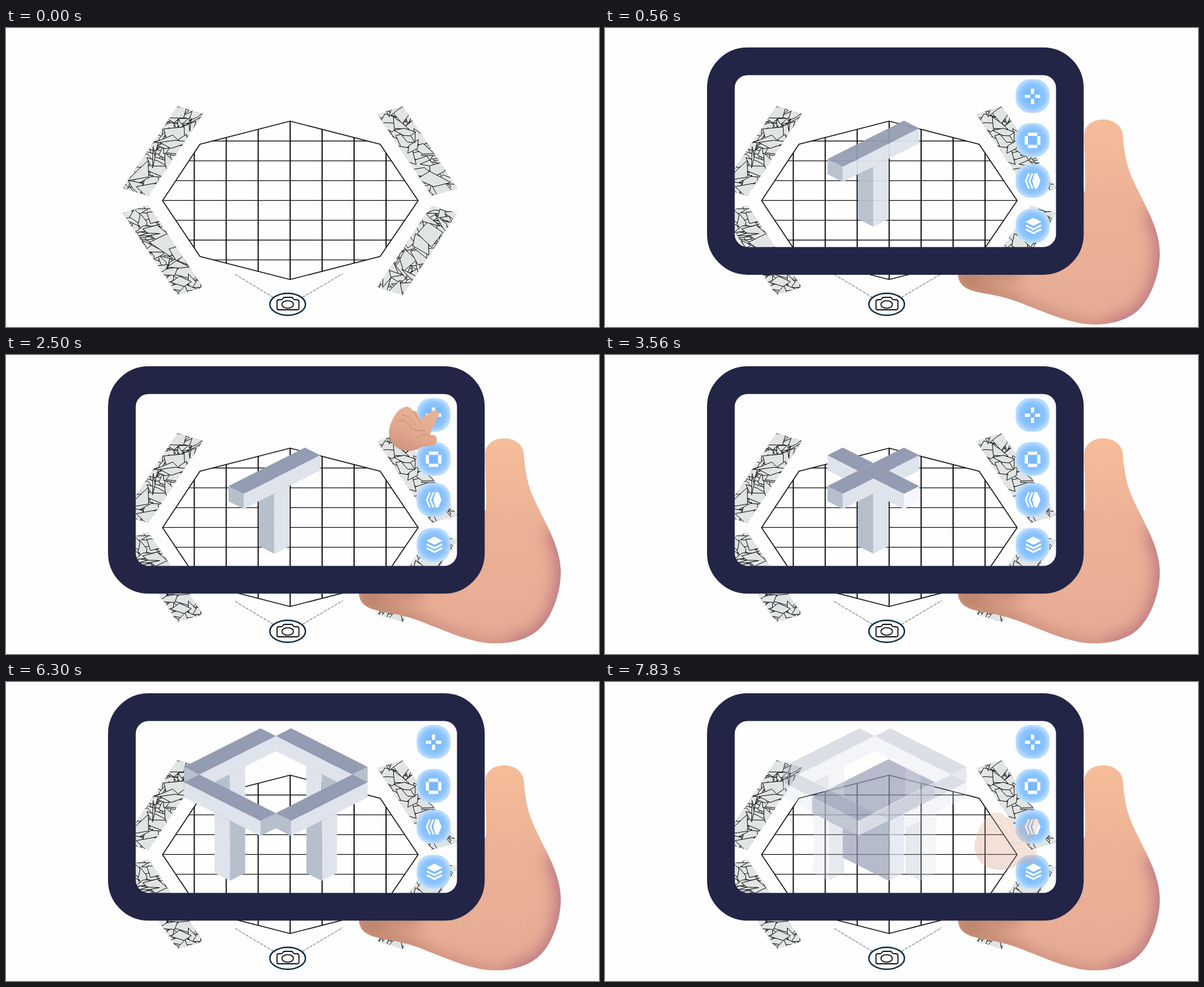
Animation, 1000 px wide and 504 px high, one loop 8000 ms. Source, as an HTML page:

```html
<!DOCTYPE html>
<html lang="en">
<head>
<meta charset="utf-8">
<title>Phone modelling loop</title>
<style>
  html, body { margin: 0; width: 100%; height: 100%; overflow: hidden; background: #fefefe; }
  svg { display: block; width: 100vw; height: 100vh; }
</style>
</head>
<body>
<svg viewBox="0 0 1000 504" fill="none">
  <defs>
    <path id="octagon" d="M479 157 631 196 695 291 631 385 479 424 327 385 264 291 327 196Z"/>
    <clipPath id="floorClip"><use href="#octagon"/></clipPath>
    <radialGradient id="glow">
      <stop offset=".3" stop-color="#78b8ff"/><stop offset=".75" stop-color="#90c6ff"/><stop offset="1" stop-color="#bcdefe"/>
    </radialGradient>
    <linearGradient id="skin" x1="0" y1="0" x2="0" y2="1">
      <stop offset="0" stop-color="#f5bd99"/><stop offset=".4" stop-color="#ecb296"/><stop offset="1" stop-color="#e6ab95"/>
    </linearGradient>
    <linearGradient id="fist" x1=".8" y1="0" x2=".3" y2="1">
      <stop offset="0" stop-color="#eab596"/><stop offset=".6" stop-color="#e0a88d"/><stop offset="1" stop-color="#d0957f"/>
    </linearGradient>
    <filter id="soft" filterUnits="userSpaceOnUse" x="560" y="100" width="440" height="440"><feGaussianBlur stdDeviation="14"/></filter>
    <path id="palm" d="M600 385H770L790 360V262H809C811 235 808 195 808 166C810 133 867 132 873 164C875 190 878 214 888 237C905 277 935 320 935.500 365C936 402 919 444 900 461C880 480 850 487 820 486C775 484 725 457 685 444C655 434 628 434 612 426C599 420 595 410 595 398Z"/>
    <clipPath id="palmClip"><use href="#palm"/></clipPath>
  </defs>

  <g id="strips"></g>
  <g stroke="#111">
    <g id="floor" clip-path="url(#floorClip)"></g>
    <use href="#octagon" stroke-width="1.6"/>
    <path opacity=".8" stroke-width=".9" stroke-dasharray="5 2" d="M451 454 386 415M500 454 568 414"/>
  </g>
  <g stroke="#111" stroke-width="1.8">
    <ellipse cx="475" cy="465.7" rx="30" ry="18.5" fill="#fefefe" stroke="#0e2d42" stroke-width="2.4"/>
    <path d="M460 458H464Q466 458 467 456T470 454H481Q483 454 484 456T487 458H490Q494 458 494 461V472Q494 475 490 475H460Q457 475 457 472V461Q457 458 460 458Z"/>
    <ellipse cx="475" cy="466" rx="9.7" ry="6.3"/>
  </g>

  <g id="models"></g>

  <g id="phone">
    <use href="#palm" fill="url(#skin)"/>
    <g clip-path="url(#palmClip)"><g filter="url(#soft)">
      <path stroke="#b8707f" stroke-width="36" d="M925 290C950 330 950 370 942 405C930 455 905 490 850 494"/>
      <path stroke="#b9796f" stroke-width="14" d="M850 494C820 494 770 486 700 452"/>
      <path stroke="#a86f58" stroke-width="16" d="M590 400C605 430 650 432 700 452M600 400H700"/>
    </g></g>
    <rect x="195.4" y="42.4" width="588.5" height="336.5" rx="45" stroke="#222545" stroke-width="46.7"/>
    <g id="buttons" fill="url(#glow)"></g>
    <g stroke="#fff" stroke-width="5.4">
      <path stroke-linejoin="round" d="M708 101.500H717M725 101.500H734M721 88.500V97.500M721 105.500V114.500"/>
      <path d="M713 165.500H729M713 186H729M710.500 168.500V183M731.500 168.500V183"/>
      <path stroke-width="3" d="M715 231.500 709.500 244 715 257M721 231.500 715.500 244 721 257"/>
      <path stroke="none" fill="#fff" d="M724.500 231H729L734.500 244 729 257H724.500L720.500 244Z"/>
      <path stroke="none" fill="#fff" d="M722.500 306 736 313 722.500 320 709 313Z"/>
      <path stroke-width="3.2" d="M709.500 319 722.500 325.500 735.500 319M709.500 325.500 722.500 332 735.500 325.500"/>
    </g>
  </g>

  <g id="finger">
    <path fill="url(#fist)" d="M1 42C2 28 12 6 26 1C33-1 38 2 41 7C46 6 49 10 50 15L54 21 73 8C80 4 88 9 84 17L73 38 70 48 76 48C84 49 83 64 76 65L56 68C46 76 26 77 14 69C5 63 0 54 1 42Z"/>
    <path stroke="#b57a66" stroke-width=".7" d="M12 26C24 20 30 24 38 34M22 14C34 14 40 22 46 32M41 7C46 14 49 20 55 28M70 48C60 46 52 48 46 54M36 34C44 40 52 42 62 40"/>
  </g>
</svg>
<script>
const $ = id => document.getElementById(id);
const LOOP = 8000;

// --- floor grid and buttons ---
for (let i = 0; i < 7; i++) {
  const x = 317.5 + i * 53.9, y = 190.5 + i * 33.4;
  $('floor').innerHTML += `<path stroke-width="2" d="M${x} 150V430"/><path stroke-width="1.3" d="M255 ${y}H700"/>`;
}
for (const y of [101, 175, 244, 320])
  $('buttons').innerHTML += `<rect x="692.5" y="${y - 28.5}" width="57" height="57" rx="24"/>`;

// --- strips of overlapping shards, mirrored around the floor centre ---
let seed = 20240;
const rand = () => (seed = seed * 16807 % 2147483647) / 2147483647;

function strip(sx, sy) {
  const id = `strip${sx}${sy}`;
  // u runs along the strip, v across it
  const at = (u, v) => `${(479 + sx * (-190 - 92 * u + 43 * v)).toFixed(1)} ${(291 + sy * (-159 + 138 * u + 13 * v)).toFixed(1)}`;
  const edge = `M${at(0, 0)}L${at(0, 1)} ${at(1, 1)} ${at(1, 0)}Z`;
  let shards = `<path stroke="none" d="${edge}"/>`;
  for (let i = 0; i < 90; i++) {
    const u = rand(), v = rand(), turn = rand() * 6.3, long = .25 + rand() * .35;
    const corner = (angle, r) => at(u + Math.cos(turn + angle) * r * .25, v + Math.sin(turn + angle) * r);
    shards += `<path d="M${corner(0, long)}L${corner(1.2, long * rand())} ${corner(3, long)} ${corner(4.6, long * rand())}Z"/>`;
  }
  return `<clipPath id="${id}"><path d="${edge}"/></clipPath>
    <g clip-path="url(#${id})" fill="#e0e4e3" stroke="#0a0a0a">${shards}</g>`;
}
for (const sy of [1, -1]) for (const sx of [1, -1]) $('strips').innerHTML += strip(sx, sy);

// --- isometric models: x runs right-down, y left-down, z up ---
const TOP = '#949cb3', MID = '#b6bfcc', LIGHT = '#dfe3ec', PALE = '#f5f7fb';

const scene = (ox, oy) => ([x0, x1], [y0, y1], [z0, z1], left, right) => {
  const at = (x, y, z) => [ox + (x - y) * 25.8, oy + (x + y) * 13 - z * 25.4];
  const face = (color, ...points) => `<path fill="${color}" d="M${points}Z"/>`;
  return face(left, at(x0, y1, z1), at(x1, y1, z1), at(x1, y1, z0), at(x0, y1, z0)) +
    face(right, at(x1, y1, z1), at(x1, y0, z1), at(x1, y0, z0), at(x1, y1, z0)) +
    face(TOP, at(x0, y0, z1), at(x1, y0, z1), at(x1, y1, z1), at(x0, y1, z1));
};
const BEAM = [-1, 0], LEG = [-5, -1], ONE = [-.5, .5], SPAN = [-2.5, 2.5];
const box = scene(452.5, 195), ringBox = scene(455, 156);

const stem = box(ONE, ONE, LEG, MID, LIGHT);
const tee = stem + box(ONE, SPAN, BEAM, MID, LIGHT);
const cross = stem + box([-2.5, -.5], ONE, BEAM, LIGHT, PALE) + box(ONE, [-2.5, -.5], BEAM, MID, LIGHT) +
  box(ONE, [-.5, 2.5], BEAM, MID, LIGHT) + box([.5, 2.5], ONE, BEAM, LIGHT, PALE);
const ring = [-3, 3].map(d => {
  const across = [d - .5, d + .5];
  return ringBox(across, ONE, LEG, MID, LIGHT) + ringBox(ONE, across, LEG, LIGHT, MID) +
    ringBox(across, SPAN, BEAM, MID, LIGHT) + ringBox(SPAN, across, BEAM, LIGHT, MID);
}).join('');
const shelter = box([-2, 1], [-1, 0], LEG, TOP, LIGHT) + box([-2, 1], [-3, 2], BEAM, TOP, LIGHT);

// the newest model lies lowest
$('models').innerHTML = [shelter, ring, cross, tee].map(art => `<g>${art}</g>`).join('');
const models = [...$('models').children].reverse();

// --- timeline ---
const taps = [
  { enter: 1430, leave: 2500, from: 89, y: 87 },
  { enter: 3700, leave: 5060, from: 89, y: 159 },
  { enter: 6300, leave: 7300, from: 161, y: 219 }
];
const FADE = 780, MOVE = 600;
const part = (t, start, length) => Math.min(1, Math.max(0, (t - start) / length));
const smooth = p => p * p * (3 - 2 * p);

function draw(t) {
  const drop = 1 - part(t, 124, 525);
  $('phone').setAttribute('transform', `translate(0 ${485 * drop * drop})`);

  const grow = [part(t, 130, 460), ...taps.map(tap => part(t, tap.leave, FADE)), 0];
  models.forEach((model, i) => model.setAttribute('opacity', grow[i] * (1 - grow[i + 1])));

  const tap = taps.find(tap => t < tap.leave + FADE) ?? taps[0];
  const come = part(t, tap.enter, MOVE), go = part(t, tap.leave, FADE);
  const near = smooth(come), lift = 1 - near + smooth(Math.min(1, go * 1.5));
  const y = tap.from + (tap.y - tap.from) * near;
  $('finger').setAttribute('opacity', Math.min(1, come * 2) * (1 - go));
  $('finger').setAttribute('transform', `translate(${645 - 23 * lift} ${y}) scale(${1 + .31 * lift})`);
}

const start = performance.now();
function frame() {
  draw((performance.now() - start) % LOOP);
  requestAnimationFrame(frame);
}
frame();
</script>
</body>
</html>
```
